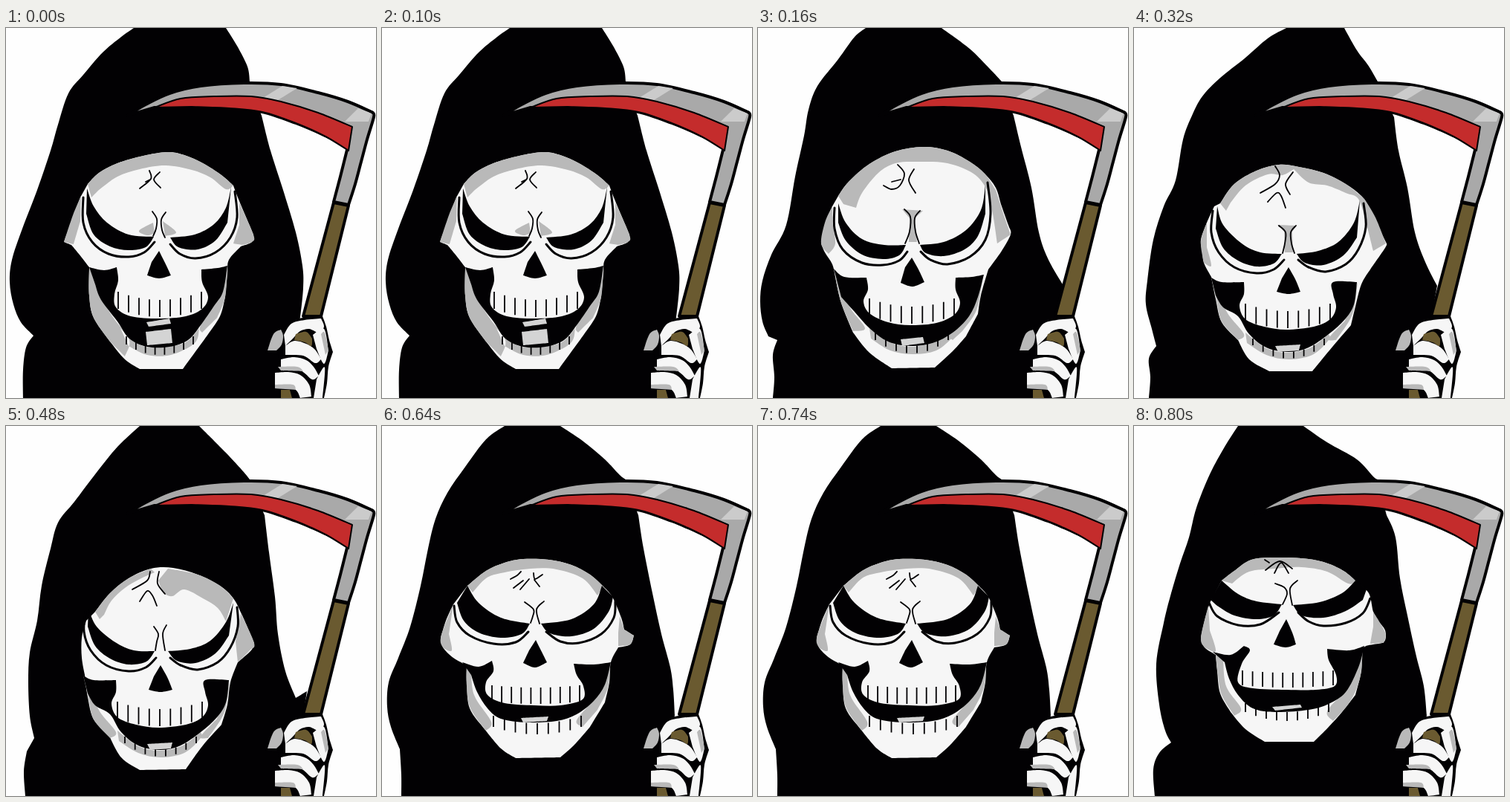
These frames come from a looping animation (498x498 px, 960 ms). An HTML page:

```html
<!DOCTYPE html>
<html lang="en">
<head>
<meta charset="utf-8">
<title>Reaper</title>
<style>
html, body { margin: 0; width: 100%; height: 100%; overflow: hidden; background: #fefefe; }
svg { display: block; width: 100vw; height: 100vh; }
</style>
</head>
<body>
<svg id="stage" viewBox="0 0 498 498"></svg>
<script>
const STEP = 160;
const BLACK = '#020103', BONE = '#f6f6f6', SHADE = '#b9b9b9', STEEL = '#a9a9a9',
      SHINE = '#cbcbcb', BLOOD = '#c42c2c', WOOD = '#6a5a30';

// Smooth curve through points; '|' makes a corner, ';' starts a new subpath.
function curve(text, close) {
  return text.split(';').map(sub => {
    let d = '', last;
    for (const run of sub.split('|')) {
      const p = run.trim().split(/\s+/).map(s => s.split(',').map(Number));
      if (last) p.unshift(last); else d = 'M' + p[0];
      for (let i = 0; i < p.length - 1; i++) {
        const b = p[i], c = p[i + 1], a = p[i - 1] || b, e = p[i + 2] || c;
        const near = b.map((v, k) => (v + (c[k] - a[k]) / 6).toFixed(1));
        const far = c.map((v, k) => (v - (e[k] - b[k]) / 6).toFixed(1));
        d += `C${near} ${far} ${c}`;
      }
      last = p[p.length - 1];
    }
    return d + (close ? 'Z' : '');
  }).join('');
}

const fill = (color, text, edge = 0) =>
  `<path d="${curve(text, true)}" fill="${color}" stroke="${BLACK}" stroke-width="${edge}" stroke-linejoin="round"/>`;
const stroke = (text, width) =>
  `<path d="${curve(text)}" fill="none" stroke="${BLACK}" stroke-width="${width}" stroke-linecap="round"/>`;

// A row of tooth gaps whose ends rise by sag.
function teeth([x0, x1, n, y, h, sag]) {
  let d = '';
  for (let i = 0; i < n; i++) {
    const u = 2 * i / (n - 1) - 1;
    d += `M${(x0 + (x1 - x0) * i / (n - 1)).toFixed(1)},${(y - sag * u * u).toFixed(1)}v${h}`;
  }
  return `<path d="${d}" stroke="${BLACK}" stroke-width="1.8"/>`;
}

const grin = {
  mouth: '104,336 118,342 148,342|148,358 142,374 150,392 175,402 205,406 242,402 264,392 272,376 268,358 268,342 300,342|296,372 284,392 262,412 235,430 208,436 178,430 155,412 140,388 120,376 110,360',
  nose: '208,322 217,338 224,355|208,358 192,355|199,337',
  tongue: '190,428|224,426|222,434|194,436',
  jaw: '104,336 111,366 118,395 140,420|148,412 126,384 112,352;301,342 294,385 272,420|262,418 284,394;150,410 178,431 208,437 238,430 262,412|262,420 240,440 208,446 178,440 152,424',
  upper: [150, 264, 9, 381, 23, 10],
  lower: [160, 256, 8, 436, 9, 18]
};

const poses = [
  {
    left: '172,0 155,12 130,33 104,63 84,88 70,130 60,165 42,218 22,270 8,312 5,342 10,372 20,396 37,414|27,430 23,460 23,498',
    right: '396,390|400,350 399,320 390,275 372,215 356,165 344,118|328,72|325,52 311,24 296,0',
    skull: '110,210 125,195 150,182 185,172 217,167 240,171 265,182 290,198 306,212|312,228 322,252 333,278|331,288 316,294|300,312 298,330 295,362|288,388 270,415|238,459|180,459|160,446 140,422|118,390 112,360 112,322|98,304 88,292|78,288|90,255 100,228',
    shade: '110,210 125,195 150,182 185,172 217,167 240,171 265,182 290,198 306,212|296,217 275,201 250,191 215,185 180,190 150,200 125,218|115,228;101,226 90,252 78,288|91,291|100,260;314,235 333,278 331,288 318,292|306,290|314,265;198,262|179,273 190,279 200,276;211,260|229,275 214,280',
    jaw: '112,322 112,360 118,390 140,422|160,442|166,420 146,392 126,362;298,322 295,362 284,390|264,410|262,400 286,362;154,404 175,424 200,430 240,424 260,404|254,424 222,440 190,440 165,428',
    eyes: '109,216 118,240 136,262 165,278 199,281|188,295 165,299 140,294 118,278 108,250;303,214 296,242 280,264 254,278 221,282|232,295 258,298 282,286 298,262',
    rims: '104,228 104,262 116,288 138,304 165,308 186,302 200,288;308,220 311,255 302,282 282,302 255,310 234,304 221,291',
    nose: '206,300 214,316 222,333|206,337 190,333|196,315',
    mouth: '112,322 132,326 149,322|151,340 146,358 148,376 168,388 205,391 242,388 264,378 272,362 264,342 263,325|285,323 298,320|292,355 280,374 262,400 245,420 220,429 190,429 166,418 150,395 128,366 120,345',
    tongue: '189,396|220,391|222,398|192,402;188,409|222,405|224,424|190,427',
    marks: '197,247 203,257 202,270 198,280;215,248 209,258 210,272 214,282;193,192 195,203 180,216;188,207 194,204;207,194 199,204 208,215',
    upper: [151, 263, 9, 366, 23, 11],
    lower: [162, 252, 8, 429, 11, 14]
  },
  {
    left: '145,0 130,12 108,42 80,78 68,110 62,145 50,200 38,265 18,305 6,340 3,368 6,395 14,415|26,420|20,440 22,470 20,498',
    right: '400,390|410,345|390,310 378,275 368,215 354,160 344,118|328,72|312,55 285,28 247,0',
    skull: '108,226 122,207 150,183 185,166 222,160 255,165 285,180 305,196 320,215 328,240 338,268|340,278 328,300 310,325|300,360 296,385|280,415|262,435 238,457|180,458|150,437 128,410|112,370 104,335|100,318 90,302 85,290|90,265 100,240',
    shade: '108,226 122,207 150,183 185,166 222,160 255,165 285,180 305,196 320,218|332,255 340,278|322,290|316,250 308,218 290,196 255,182 215,180 185,182 162,195 140,222 132,242|115,237;100,240 90,262 85,290 95,304|104,290 100,262;194,244|222,246|211,256|214,288|203,288|204,256',
    jaw: '104,335 112,370 128,408|144,404 125,378 112,350;302,340 294,380 275,408|262,420|258,412 285,385;150,404 175,422 205,429 238,423 262,410|262,416 240,434 208,439 178,434 152,418',
    eyes: '108,236 118,262 140,284 170,292 199,292|190,306 168,311 140,305 118,286 108,262;306,212 300,245 280,272 250,288 218,292|226,303 250,307 278,298 296,280 306,250',
    rims: '103,242 103,270 114,298 140,316 168,319 190,313 201,301;309,208 313,250 306,285 285,308 255,318 232,312 219,301',
    nose: '207,309 216,325 224,342|208,348 192,343|198,322',
    mouth: '102,324 116,335 146,336|148,352 142,368 150,384 175,396 205,400 240,397 264,386 272,370 266,352 266,336|288,335 304,332|296,362 284,388 262,410 235,424 205,428 175,422 150,404 130,382 112,362',
    tongue: '192,419|222,416|224,424|194,428',
    marks: '197,244 205,254 204,274 198,290;218,246 211,256 212,274 217,290;188,184 197,196 191,212 180,217 169,212;180,207 192,204;210,190 203,205 212,222',
    upper: [150, 264, 9, 375, 23, 11],
    lower: [158, 256, 8, 428, 10, 18]
  },
  {
    ...grin,
    left: '205,0 180,14 150,40 115,68 92,92 78,118 66,150 56,205 40,240 26,285 18,340 16,372 24,405 30,428|20,445 22,470 20,498',
    right: '400,390|408,347|392,315 378,275 368,215 356,165 350,120|328,72|315,50 300,30 283,0',
    skull: '116,236 135,210 165,192 195,184 222,187 255,195 285,210 305,225 316,240 326,262 340,290|338,296 318,325|306,345 298,375 292,400|268,428 240,462|182,462|155,446 140,420|118,396 110,365 104,335|94,316 92,300 90,285 98,262 108,240',
    shade: '116,236 135,210 165,192 195,184 222,187 255,195 285,210 310,230|325,255 339,290|322,300|312,260|302,230 285,222 260,212 235,208 215,190|200,198 180,197 150,212 130,235|124,246;98,262 90,288 94,316|104,320 98,295;193,265|219,266|213,274|214,302|203,302|202,274',
    eyes: '112,240 120,265 145,290 170,302 199,304|188,317 165,321 140,313 120,296 110,270;304,232 296,262 275,288 248,300 219,304|230,316 255,319 282,306 300,282',
    rims: '106,246 104,275 114,302 135,322 165,330 188,325 202,312;309,236 312,268 302,298 285,318 258,328 235,322 221,312',
    marks: '195,266 204,275 203,290 200,303;218,266 211,275 212,290 216,303;190,186 196,198 190,210 170,222;214,194 204,210 210,224;180,234 192,222 198,226 204,242'
  },
  {
    ...grin,
    left: '180,0 150,28 120,65 92,102 70,130 60,165 48,215 42,262 32,305 30,345 32,390 38,420|28,438|24,465 26,498',
    right: '400,390|405,357|390,366|376,330 366,280 362,230 354,170 348,120|328,72|320,62 295,35 260,0',
    skull: '120,250 140,225 165,205 195,192 225,191 258,200 288,215 306,232 318,255 334,292|330,302 312,318|302,345 298,375 290,402|265,430 242,462|180,463|155,446 138,415|118,395 110,365 106,335|102,312 102,285 108,262',
    shade: '120,250 140,225 165,205 195,192|200,197|180,206 160,218 142,235 132,254|126,260;218,192 258,200 288,215 306,232|296,263|285,245 265,232 240,220 224,229 212,224 205,208;316,252 334,292 328,302 312,318|309,290',
    eyes: '111,246 122,270 147,291 172,302 200,303|189,317 165,321 140,313 120,296 110,270;306,238 296,264 275,289 248,300 218,303|230,316 255,319 282,306 300,282',
    rims: '107,250 105,277 114,302 135,322 165,330 188,325 202,312;311,244 312,270 302,298 285,318 258,328 235,322 221,312',
    marks: '199,270 205,280 203,290 201,302;216,268 211,280 214,302;194,196 190,208 170,220;206,196 204,212 214,226;180,236 190,222 197,228 203,242'
  },
  {
    left: '165,0 140,18 112,55 88,90 72,125 62,165 52,215 38,270 22,312 9,345 7,378 12,405 24,435|26,470 26,498',
    right: '394,390|392,355 388,325 376,280 364,225 352,165 345,120|328,72|320,66 300,45 270,20 240,0',
    skull: '115,215 140,195 165,184 190,179 225,180 255,187 280,200 298,216|310,230 322,258 326,274|339,282|334,294 318,298|308,318 306,345 300,372|280,405|258,430 240,446|180,447|160,434 138,408|118,380 114,345 114,322|96,312 82,298 79,285|86,262 96,240',
    shade: '115,215 140,195 165,184 190,179 225,180 255,187 280,200 298,216|290,228|270,205 235,193 200,192 160,198 140,205 122,224;96,240 79,285 84,300|94,302 90,280;320,256|326,274|339,282|334,294 318,296|318,278',
    jaw: '114,322 114,350 119,380 140,410|147,398 124,362 120,325;307,318 304,352 290,382|270,405|262,396 286,368',
    eyes: '115,215 130,238 160,258 199,266|188,280 160,285 130,278 110,262 101,238;296,215 285,240 255,260 214,266|226,279 255,283 285,273 305,250 311,230',
    rims: '97,242 101,264 118,282 150,293 180,291 197,277;314,236 312,258 295,280 265,292 240,290 221,277',
    nose: '207,288 215,304 222,318|206,325 190,319|198,302',
    mouth: '108,318 130,324 148,316|150,330 140,345 142,362 165,373 205,376 240,376 270,368 271,350 262,335 258,320|285,321 308,318|300,348 285,370 262,388 235,397 195,399 160,394 142,380 128,358 120,335',
    tongue: '187,393|224,391|222,397|190,399',
    marks: '192,237 204,247 203,256 200,265;218,236 208,247 212,266;173,206 182,201 187,196;177,218 190,208;186,220 198,206;204,198 206,206 216,200;205,207 212,216',
    upper: [148, 266, 10, 352, 22, 3],
    lower: [150, 268, 9, 400, 15, 10]
  },
  {
    left: '140,0 122,28 102,65 84,110 74,150 62,185 50,225 40,265 30,320 34,375 42,410 50,426|34,440 26,462 28,498',
    right: '394,390|390,350 380,310 368,255 358,205 352,150 340,120|328,72|322,68 300,45 260,22 228,0',
    skull: '118,208 135,195 158,180 190,177 225,178 255,183 282,195 300,210|316,225 322,250 328,262|338,275 337,290 322,294|308,300 306,330 298,362|280,385 262,405 242,425|176,425|150,408 130,385|116,360 112,330 110,308|95,298 90,285|95,262 102,238',
    shade: '118,208 135,195 158,180 190,177 225,178 255,183 282,195 300,210|288,212 260,196 225,190 190,192 155,196 132,212;100,242 90,285 95,298|110,303 102,275;322,250 338,278 336,292|318,293|322,270',
    jaw: '110,308 113,335 118,362 135,390|144,380 124,350 120,310;308,300 304,340 290,372 268,397|260,384 285,355 300,330',
    eyes: '118,208 140,226 165,236 199,240|188,255 165,260 135,255 112,242|103,234;299,207 280,225 250,237 214,241|226,255 255,258 285,249 308,234|313,220',
    rims: '101,238 112,256 140,268 170,267 195,251;318,232 308,252 285,265 255,269 235,263 221,251',
    nose: '205,260 213,278 218,294|204,298 188,294|196,276',
    mouth: '106,304 130,308 148,296|156,302 145,320 140,345 160,353 205,355 245,355 270,350 272,335 262,315 260,300|290,302 310,296|302,325 285,358 262,374 235,382 190,385 160,380 140,362 128,340 122,318',
    tongue: '186,378|224,375|226,379|190,383',
    marks: '190,212 202,217 206,226 200,240;220,208 210,219 213,241;177,194 196,182 213,192;182,184 176,180;189,198 198,184 208,198',
    upper: [146, 268, 10, 332, 20, 3],
    lower: [150, 262, 9, 385, 12, 12]
  }
];

const body = p =>
  fill(BLACK, `${p.left}|362,498|372,430|${p.right}`) + fill(BONE, p.skull) +
  fill(SHADE, `${p.shade};${p.jaw}`) + fill(BLACK, `${p.eyes};${p.nose};${p.mouth}`) +
  fill('#d4d4d4', p.tongue) + stroke(p.rims, 3) + stroke(p.marks, 1.8) +
  teeth(p.upper) + teeth(p.lower);

const scythe =
  fill(WOOD, '441,235|461,239|424,388|400,388', 4) +
  fill(STEEL, '163,118 188,103 220,88 262,78 320,74 370,76 420,87 460,99 494,114|495,120 486,150 478,180 470,210 461,238|441,234|450,200 460,160|430,145 390,128 345,113 300,108 250,106 200,107', 4) +
  fill(SHINE, '346,94|372,78|392,81|366,97;456,126|474,108|492,115|488,126') +
  fill(BLOOD, '200,107 235,95 280,92 330,92 370,99 420,114 466,133|461,165|430,146 390,128 345,113 300,108 250,106', 2);

const hand =
  fill(BLACK, '366,404|385,394 400,390 426,388|431,402 435,420 440,436|434,456 432,478 428,498|358,498|358,470|366,456 367,440|349,438|356,414') +
  fill(SHADE, '352,434|360,412 370,406|373,414 371,426 364,434') +
  fill(BONE, '374,413|384,398 402,393 424,391|428,402 421,410 408,405 396,408 388,416|376,428;413,413|428,405 434,434|428,452 418,432;' +
    '376,428|388,421 404,425 416,433 424,446|416,451 400,441 376,440;370,446|388,443 404,447 414,456 421,468|412,473 396,461 370,460;' +
    '362,464|380,463 396,467 408,480 411,496|396,498|388,486 362,484;418,473|429,457 426,498|414,498') +
  fill(SHADE, '366,456|392,456 400,462|370,461;362,480|386,480 390,487|362,485;424,412|429,410 434,434|430,440') +
  fill(WOOD, '390,412 404,409 412,418|411,428 402,423 388,420;370,487|382,487|385,498|370,498');

document.getElementById('stage').innerHTML =
  poses.map(p => `<g visibility="hidden">${body(p)}</g>`).join('') + scythe + hand;
const layers = document.querySelectorAll('#stage > g');

function draw(time) {
  const now = Math.floor(time / STEP) % poses.length;
  layers.forEach((g, i) => g.setAttribute('visibility', i === now ? 'visible' : 'hidden'));
}

const start = performance.now();
function tick() {
  draw(performance.now() - start);
  requestAnimationFrame(tick);
}
tick();
</script>
</body>
</html>
```
